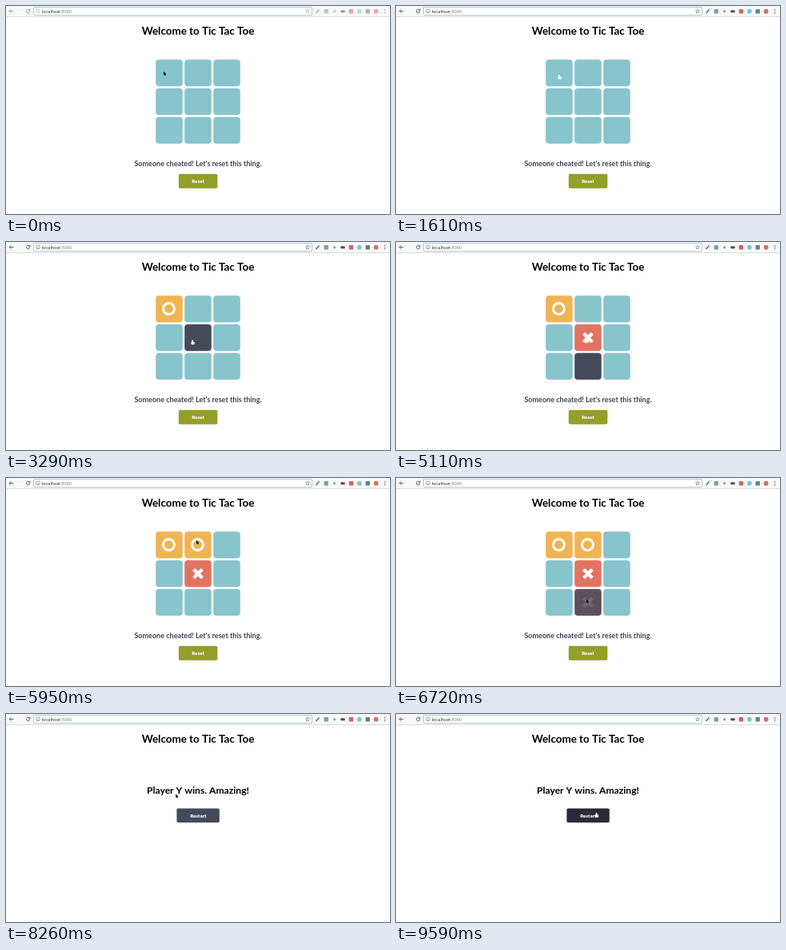
An HTML page with a canvas for the animation above (9660 ms loop, 480 by 261 pixels).

```html
<!DOCTYPE html>
<html lang="en">
<head>
<meta charset="utf-8">
<title>Tic Tac Toe</title>
<style>
html, body { margin: 0; width: 100%; height: 100%; overflow: hidden; background: #fff; }
canvas { display: block; width: 480px; height: 261px; }
</style>
</head>
<body>
<canvas id="stage" width="480" height="261"></canvas>
<script>
const ctx = document.getElementById('stage').getContext('2d');
const LOOP = 9660, STEP = 70, FADE = 300, GLIDE = 420, REACH = 140, WIN = 7630;

const TEAL = [136, 196, 204], DARK = [69, 74, 91], NIGHT = [43, 42, 56];
const MARKS = { O: [240, 180, 85], X: [226, 115, 98] };

// The pointer leaves for a cell at `go`, aims off its centre, and may click
const visits = [
  { cell: 0, go: 1470, dx: 3, dy: 4, click: 1960, mark: 'O' },
  { cell: 4, go: 2450, dx: -7, dy: 3, click: 3920, mark: 'X' },
  { cell: 7, go: 4270, dx: -2, dy: -4 },
  { cell: 1, go: 5040, dx: -2, dy: -6, click: 5600, mark: 'O' },
  { cell: 7, go: 6090, dx: -2, dy: -4, click: 6650, mark: 'X' },
  { cell: 2, go: 7070, dx: -6, dy: -2 }
];
visits.forEach((v, i) => {
  const next = visits[i + 1];
  v.hover = v.go + REACH;
  v.leave = v.click || (next ? next.go + REACH : WIN);
});

const cellX = i => 187 + i % 3 * 36;
const cellY = i => 67 + Math.floor(i / 3) * 36;

const stops = visits.map(v => ({ go: v.go, x: cellX(v.cell) + 17 + v.dx, y: cellY(v.cell) + 17 + v.dy }));
stops.push({ go: 8050, x: 175, y: 98 }, { go: 8190, x: 247, y: 106 }, { go: 9170, x: 250.5, y: 124 });
const OVER_BUTTON = 9170 + REACH;

const clamp = v => Math.max(0, Math.min(1, v));
const smooth = v => v * v * (3 - 2 * v);
const easeOut = v => 1 - (1 - v) ** 3;
const mix = (a, b, p) => a.map((v, i) => v + (b[i] - v) * p);
const rgb = c => `rgb(${c.map(Math.round).join()})`;
const fade = (t, start) => smooth(clamp((t - start) / FADE));

function box(x, y, w, h, r, fill) {
  ctx.beginPath();
  ctx.roundRect(x, y, w, h, r);
  ctx.fillStyle = fill;
  ctx.fill();
}

function disc(x, y, r, fill) {
  box(x - r, y - r, 2 * r, 2 * r, r, fill);
}

function pen(color, width) {
  ctx.strokeStyle = color;
  ctx.lineWidth = width;
}

function line(...points) {
  ctx.beginPath();
  points.forEach(([x, y]) => ctx.lineTo(x, y));
  ctx.stroke();
}

function arc(x, y, r, from = 0, to = 7) {
  ctx.beginPath();
  ctx.arc(x, y, r, from, to);
  ctx.stroke();
}

function label(text, x, y, size, color, font = 'bold', family = 'Lato') {
  ctx.font = `${font} ${size}px ${family}, sans-serif`;
  ctx.fillStyle = color;
  ctx.fillText(text, x, y);
}

function drawStar(x, y) {
  ctx.beginPath();
  for (let i = 0; i < 10; i++) {
    const a = i * Math.PI / 5 - Math.PI / 2, r = i % 2 ? 1.3 : 2.7;
    ctx.lineTo(x + r * Math.cos(a), y + r * Math.sin(a));
  }
  ctx.closePath();
  ctx.stroke();
}

function drawBar(t) {
  box(0, 0, 480, 13, 0, '#f7f8f8');
  box(0, 13, 480, 1, 0, '#d9dcdc');
  box(34, 1, 349, 11, 2, '#a9cdd3');
  box(35, 2, 347, 9, 1, '#fff');

  ctx.textAlign = 'left';
  label('localhost', 44.7, 8.6, 5.7, '#333', 'normal', 'Roboto');
  label(':8080', 44.7 + ctx.measureText('localhost').width, 8.6, 5.7, '#888', 'normal', 'Roboto');

  ctx.globalAlpha = t < 630 ? 0.55 : 1;
  pen('#555', 0.9);
  line([9.4, 6.5], [4.2, 6.5]);
  line([6.6, 4.1], [4.2, 6.5], [6.6, 8.9]);
  arc(27.7, 6.5, 2.3, 0.3, 5.4);
  line([30, 3.8], [30, 6], [28, 6]);
  pen('#777', 0.7);
  arc(40, 6.5, 2.4);
  line([40, 6], [40, 8]);
  drawStar(377, 6.6);

  pen('#52656d', 1.4);
  line([387.5, 9], [391.5, 4.5]);
  const icons = ['#7ba297', '#9aabaf', '#5c4a4c', '#d0645c', '#7cc6d2', '#61808a', '#d66d63'];
  icons.forEach((color, i) => {
    const x = 400.2 + i * 10.4;
    if ([1, 4, 6].includes(i)) disc(x, 6.7, i === 1 ? 1.8 : 2.9, color);
    else box(x - 2.7, i === 2 ? 5.3 : 4, 5.4, i === 2 ? 3 : 5.4, 1, color);
  });
  for (let i = 0; i < 3; i++) disc(473.7, 4.4 + i * 2.2, 0.7, '#555');
  ctx.globalAlpha = 1;
}

function drawMark(x, y, mark, alpha) {
  ctx.save();
  ctx.globalAlpha = alpha;
  ctx.translate(x, y);
  if (mark === 'O') {
    pen('#fff', 3);
    arc(-0.5, -0.3, 7);
  } else {
    ctx.rotate(Math.PI / 4);
    box(-7.6, -2.2, 15.2, 4.4, 0.9, '#fff');
    box(-2.2, -7.6, 4.4, 15.2, 0.9, '#fff');
  }
  ctx.restore();
}

function drawCell(t, i) {
  const x = cellX(i), y = cellY(i), own = visits.filter(v => v.cell === i);
  let color = TEAL;
  for (const v of own) {
    color = mix(color, DARK, fade(t, v.hover));
    color = mix(color, MARKS[v.mark] || TEAL, fade(t, v.leave));
  }
  box(x + 0.2, y + 0.2, 33.6, 33.6, 4, rgb(color));
  own.filter(v => v.mark).forEach(v => drawMark(x + 17, y + 17, v.mark, fade(t, v.click)));
}

function drawGame(t) {
  for (let i = 0; i < 9; i++) drawCell(t, i);
  label("Someone cheated! Let's reset this thing.", 240, 201.2, 9.04, '#3f4353');
  box(215.8, 210.8, 48.6, 18, 1.8, '#939f29');
  label('Reset', 240, 222.4, 6.2, '#fff', 900);
}

function drawResult(t) {
  label('Player Y wins. Amazing!', 240, 100.4, 12.1, '#000');
  box(213.4, 118.5, 53.4, 17.8, 1.8, rgb(mix(DARK, NIGHT, fade(t, OVER_BUTTON - STEP))));
  label('Restart', 240.3, 130.2, 6.2, '#fff', 900);
}

function drawPointer(t) {
  let x = 197, y = 82;
  for (const s of stops) {
    const p = easeOut(clamp((t - s.go) / GLIDE));
    x += (s.x - x) * p;
    y += (s.y - y) * p;
  }
  const hand = t >= OVER_BUTTON || visits.some(v => t >= v.hover && t < v.leave);
  ctx.save();
  ctx.translate(x, y);
  ctx.scale(0.85, 0.85);
  if (hand) {
    box(-0.9, -0.3, 1.8, 5, 0.9, '#fff');
    box(-1.8, 2.6, 5, 4.2, 1.4, '#fff');
  } else {
    pen('#000', 1.1);
    line([1.4, 3.5], [2.7, 6.3]);
    ctx.beginPath();
    ctx.moveTo(0, 0);
    ctx.lineTo(0, 5.6);
    ctx.lineTo(4, 4.1);
    ctx.fillStyle = '#000';
    ctx.fill();
  }
  ctx.restore();
}

function draw(t) {
  box(0, 0, 480, 261, 0, '#fff');
  drawBar(t);
  ctx.textAlign = 'center';
  label('Welcome to Tic Tac Toe', 240, 36.3, 13.4, '#000');
  (t < WIN ? drawGame : drawResult)(t);
  drawPointer(t);
}

const begin = performance.now();
function tick() {
  const t = (performance.now() - begin) % LOOP;
  draw(Math.floor(t / STEP) * STEP);
  requestAnimationFrame(tick);
}
tick();
</script>
</body>
</html>
```
